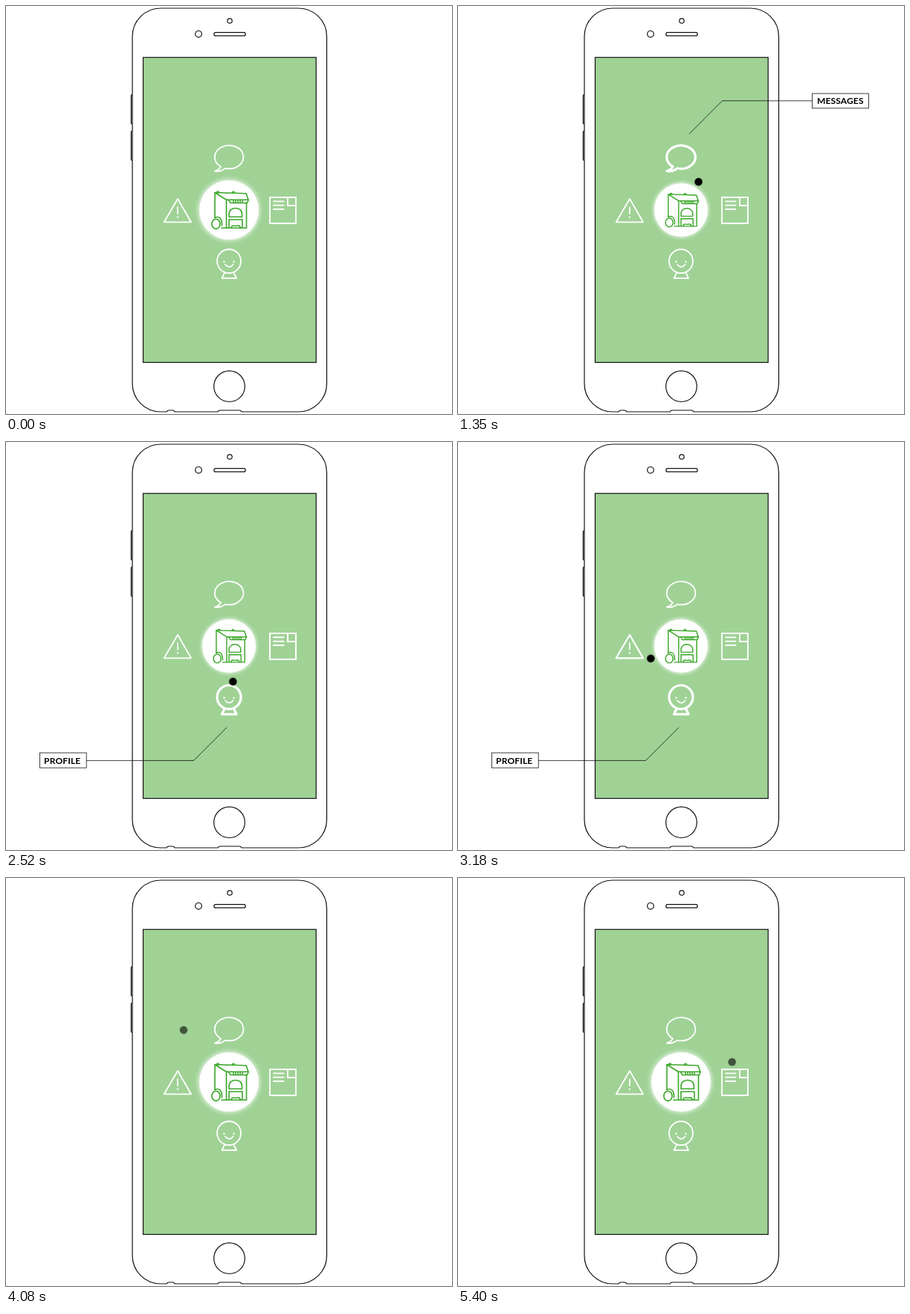
Animation of 600x550 px, one loop 5.43 s. Source, as an HTML page without scripts:

```html
<!DOCTYPE html>
<html lang="en">
<head>
<meta charset="utf-8">
<title>Radial menu</title>
<style>
html, body { margin: 0; width: 100%; height: 100%; overflow: hidden; background: #fff; }
svg { display: block; width: 600px; height: 550px; }

.phone { fill: #fff; stroke: #111; stroke-width: 1.2; }
.icon { fill: none; stroke: #fff; stroke-width: 1.8; stroke-linejoin: round; stroke-linecap: round; }
.icon .solid { fill: #fff; stroke: none; }
.bin { fill: none; stroke: #3aa728; stroke-width: 1.6; stroke-linejoin: round; stroke-linecap: round; }
.label { opacity: 0; fill: none; stroke: #111; stroke-width: .8; }
.label text { fill: #000; stroke: none; font: 700 12px Lato, "Open Sans", sans-serif; letter-spacing: .15px; text-anchor: middle; }

.icon, .label, .hub, .dot { animation: 5430ms linear infinite; }
.hub { transform-origin: 300px 275px; animation-name: hub; }
.dot { animation-name: orbit, press; animation-duration: 5430ms; }
.icon.msg { animation-name: msg-icon; }
.icon.wall { animation-name: wall-icon; }
.icon.profile { animation-name: profile-icon; }
.icon.alert { animation-name: alert-icon; }
.label.msg { animation-name: msg-label; }
.label.wall { animation-name: wall-label; }
.label.profile { animation-name: profile-label; }
.label.alert { animation-name: alert-label; }

@keyframes hub {
  0%, 16.02%, 74.03%, 100% { transform: scale(1); }
  21.5%, 69.06% { transform: scale(.9); }
}

/* the dot moves in polar coordinates around the hub */
@keyframes orbit {
  0%, .5525% { transform: rotate(-25.9deg) translateX(56px); animation-timing-function: cubic-bezier(.2, .5, .5, 1); }
  8.287%, 12% { transform: rotate(-31deg) translateX(-2.9px); }
  13.81% { transform: rotate(-85deg) translateX(4px); }
  17.127% { transform: rotate(-90deg) translateX(29px); }
  19.89% { transform: rotate(-90deg) translateX(45px); }
  32.597% { transform: rotate(-9.1deg) translateX(44.2px); }
  46.409% { transform: rotate(83.5deg) translateX(48.3px); }
  58.564% { transform: rotate(157.3deg) translateX(44px); }
  62.43% { transform: rotate(180deg) translateX(46px); }
  67.956% { transform: rotate(203deg) translateX(62px); animation-timing-function: ease-out; }
  74.03%, 77.348% { transform: rotate(228.9deg) translateX(92.9px); animation-timing-function: ease-in-out; }
  87.845%, 96% { transform: rotate(230deg) translateX(172px); }
  96.01%, 96.685% { transform: rotate(-16.3deg) translateX(115.7px); }
  99.448% { transform: rotate(-21.4deg) translateX(74.1px); }
  100% { transform: rotate(-23.5deg) translateX(65px); }
}
@keyframes press {
  0%, .5% { opacity: 0; }
  .51%, 12.155% { opacity: .6; }
  17.127% { opacity: .87; }
  19.89%, 69.06% { opacity: 1; }
  74.03%, 77.348% { opacity: .6; }
  87.845%, 96.13% { opacity: 0; }
  96.685% { opacity: .1; }
  99.448%, 100% { opacity: .6; }
}

@keyframes msg-icon { 0%, 14.92%, 34.8%, 100% { stroke-width: 1.8; } 19.34%, 29.83% { stroke-width: 3.2; } }
@keyframes wall-icon { 0%, 27.6%, 47.5%, 100% { stroke-width: 1.8; } 32.04%, 42.5% { stroke-width: 3.2; } }
@keyframes profile-icon { 0%, 42%, 63.5%, 100% { stroke-width: 1.8; } 45.86%, 59.67% { stroke-width: 3.2; } }
@keyframes alert-icon { 0%, 56.9%, 74%, 100% { stroke-width: 1.8; } 61.9%, 69.6% { stroke-width: 3.2; } }

@keyframes msg-label { 0%, 14.92%, 31.5%, 100% { opacity: 0; } 19.89%, 27.6% { opacity: 1; } }
@keyframes wall-label { 0%, 28.2%, 45.86%, 100% { opacity: 0; } 32.04%, 42.5% { opacity: 1; } }
@keyframes profile-label { 0%, 41.44%, 63%, 100% { opacity: 0; } 45.86%, 59.1% { opacity: 1; } }
@keyframes alert-label { 0%, 59.1%, 75.14%, 100% { opacity: 0; } 63.5%, 70.17% { opacity: 1; } }
</style>
</head>
<body>
<svg viewBox="0 0 600 550">
  <defs>
    <filter id="glow" x="-30%" y="-30%" width="160%" height="160%"><feGaussianBlur stdDeviation="3"/></filter>
  </defs>

  <g class="phone">
    <rect x="168.4" y="119.5" width="3" height="39.5" rx="1"/>
    <rect x="168.4" y="168.5" width="3" height="39.5" rx="1"/>
    <path d="M208 3H393.5A38 38 0 0 1 431.5 41V509A38 38 0 0 1 393.5 547H317q-1-2-3-2H288q-2 0-3 2H227q-1-2-3-2H219q-2 0-3 2H208A38 38 0 0 1 170 509V41A38 38 0 0 1 208 3Z"/>
    <circle cx="301" cy="20" r="3.2"/>
    <circle cx="259" cy="37.8" r="4.3"/>
    <rect x="279.8" y="35.6" width="42.4" height="4.6" rx="2.3"/>
    <circle cx="300.5" cy="512.7" r="20.8"/>
    <rect x="184.5" y="69.3" width="232.7" height="411.2" fill="#a0d296"/>
  </g>

  <g class="icon msg">
    <path d="M289 216.5A19.3 15.7 0 1 1 295 218.8C291 222 286 223.5 281 222.5C285.500 221.500 287.500 219 289 216.500Z"/>
  </g>
  <g class="icon wall">
    <path d="M355 258H390V293H355ZM379 258V269H390" stroke-linejoin="miter"/>
    <path d="M360 263.300H373.500M360 268.700H373.500M360 274H373.500"/>
  </g>
  <g class="icon profile">
    <circle cx="300" cy="344" r="16"/>
    <path d="M294 359.500L290.500 367H310L306.500 359.500"/>
    <path d="M295 348.500Q300.300 355 305.500 348.500" stroke-width="1.7"/>
    <g class="solid"><circle cx="293.500" cy="344.800" r="1.2"/><circle cx="306.500" cy="344.800" r="1.2"/></g>
  </g>
  <g class="icon alert">
    <path d="M231 260L249 291.300H212.700Z"/>
    <path d="M231 271V280" stroke-width="1.7"/>
    <circle class="solid" cx="231" cy="284.600" r="1.2"/>
  </g>

  <g class="hub">
    <circle cx="300" cy="275" r="41" fill="#fff" opacity=".85" filter="url(#glow)"/>
    <circle cx="300" cy="275" r="40" fill="#fff" opacity=".95"/>
    <g class="bin">
      <path d="M281 251.500L323 252.800L326 261.300H296.500Z"/>
      <path d="M283.500 251.500a1.500 1.500 0 0 1 3 0M304.500 251.800a1.500 1.500 0 0 1 3 0"/>
      <path d="M299.500 261.500L302 265.500H324.500L326 261.500M306 262V265M309 262V265M312 262V265M315 262V265M318 262V265"/>
      <path d="M281 251.500V285M296.500 261.300V299.300M290 299.300H323.500V266"/>
      <ellipse cx="282.500" cy="293.800" rx="5.600" ry="6.600"/>
      <path d="M280.500 285.500C287 282.500 291 287 290.500 296"/>
      <path d="M300 284.300V280.500C300 269.800 317.500 269.800 317.500 280.500V284.300Z"/>
      <path d="M300 299V288H318V299M303 299C304 294.500 307 296.500 309 296.500S314.500 294.500 315.500 299"/>
    </g>
  </g>

  <g class="label msg">
    <path d="M476.500 127.800H355.500L311 172.500"/>
    <rect x="476.500" y="118" width="76" height="19.800"/>
    <text x="514.300" y="132.400">MESSAGES</text>
  </g>
  <g class="label wall">
    <path d="M519 231H450L405.700 275.500"/>
    <rect x="519" y="221" width="43.500" height="20"/>
    <text x="540.800" y="235.400">WALL</text>
  </g>
  <g class="label profile">
    <path d="M108.200 429.400H252.500L297 384.800"/>
    <rect x="45.500" y="419" width="62.700" height="20.200"/>
    <text x="75.700" y="433.700">PROFILE</text>
  </g>
  <g class="label alert">
    <path d="M57 198.400H175.300L219.800 243"/>
    <rect x="2" y="188.500" width="55" height="20"/>
    <text x="29.500" y="202.800">ALERTS</text>
  </g>

  <g transform="translate(300 275)"><circle class="dot" r="5.300"/></g>
</svg>
</body>
</html>
```
